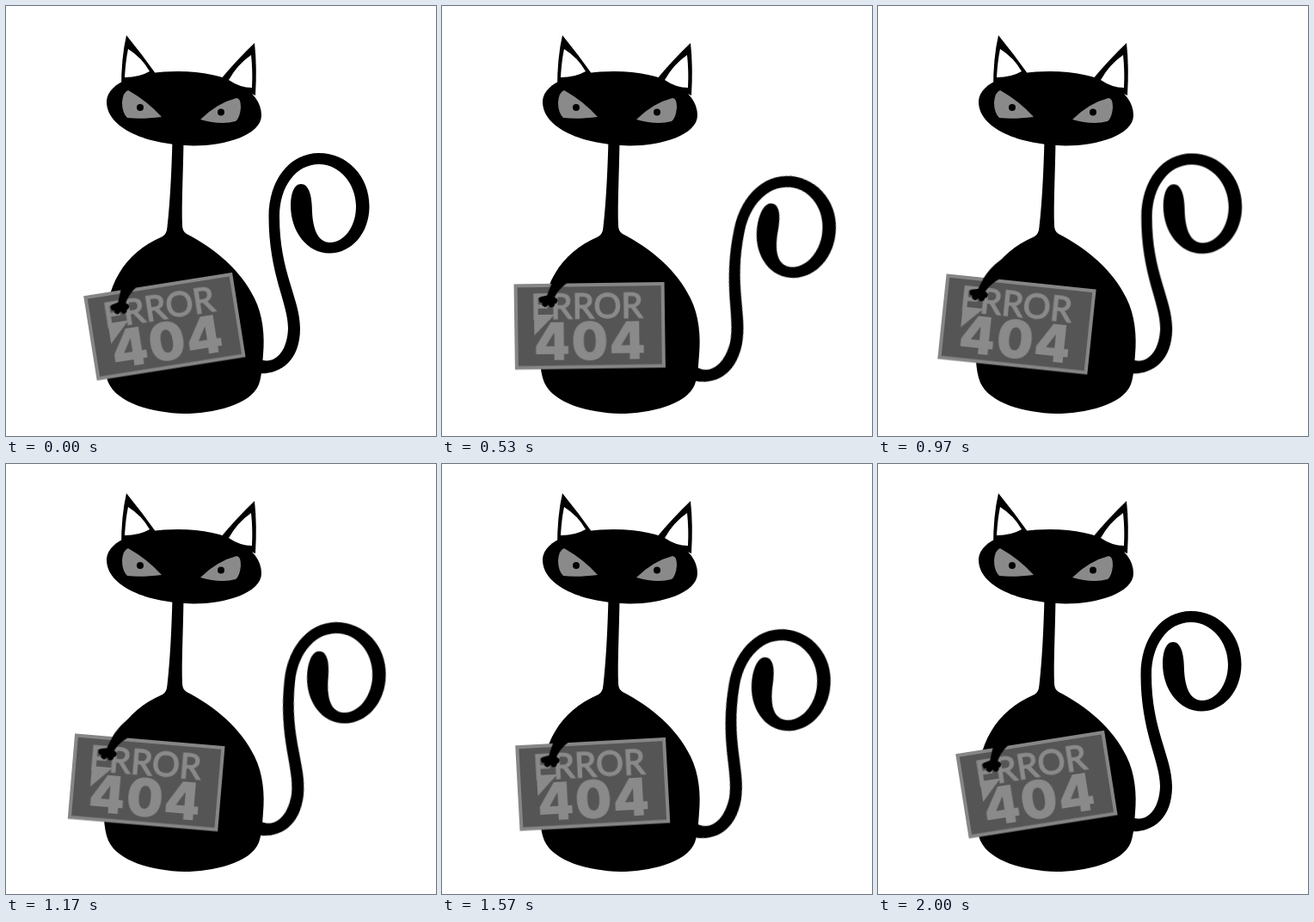
An HTML page that plays this animation: 500 by 500 pixels, repeating every 2.03 s.

```html
<!DOCTYPE html>
<html lang="en">
<head>
<meta charset="utf-8">
<title>Error 404 cat</title>
<style>
  html, body { margin: 0; width: 100%; height: 100%; overflow: hidden; background: #fff; }
  svg { display: block; width: 100vw; height: 100vh; }

  .tail, .held { animation: 2030ms cubic-bezier(.333, 0, .667, 1) infinite; }
  .tail { transform-origin: 254px 417px; animation-name: sway; }
  .held { transform-origin: 183.4px 284px; animation-name: swing; }

  /* Both motions rest for the last 30 ms of the loop. */
  @keyframes sway {
    0%, 45.98%, 98.52%, 100% { transform: rotate(0deg); }
    24.63%, 68.97% { transform: rotate(12deg); }
  }
  @keyframes swing {
    0%, 98.52%, 100% { transform: rotate(-9deg); }
    49.26% { transform: rotate(6deg); }
  }

  .fingers { fill: none; stroke: #000; stroke-width: 7; stroke-linecap: round; }
  .board { fill: #555; stroke: #868686; stroke-width: 4; }
  .light { fill: #8a8a8a; }
  .word { font: 400 40px Lato, sans-serif; stroke: #8a8a8a; stroke-width: 1.4; }
  .code { font: 900 60px Inter, sans-serif; letter-spacing: 1.5px; text-anchor: middle; }
</style>
</head>
<body>
<svg viewBox="0 0 500 500">
  <path class="tail" d="M270 422 L285 426 C312 432 342 418 342 375 C342 340 318 310 318 245 C318 210 337 184 364 184 C388 184 407 207 407 233 C407 258 392 275 377 275 C362 275 357 258 356 240 C356 220 352 207 343 207 C335 207 331 218 331 232 C331 262 350 287.500 376 287.500 C402 287.500 422.500 264 422.500 233 C422.500 198 397 171 364 171 C330 171 305.500 202 305.500 245 C305.500 312 328 345 328 375 C327 400 315 415 299 412 L270 405Z"/>

  <path d="M193.500 155 H206.500 C206 195 204 230 205 255 Q205 262 210 265 C243 282 273 307 289 340 C299 360 301 385 299 405 C298 420 297 432 294 440 C285 464 240 474 207 474 C170 473 130 462 119 438 C113 424 113 400 114 380 C116 325 136 288 182 268 Q187 265 187.500 257 C190.500 230 192.500 195 193.500 155Z"/>

  <g class="head">
    <path d="M117 110 C119 88 155 76 200 76 C258 76 297 98 297 127 C297 150 255 162.500 218 162.500 C165 161.500 116 143 117 110Z"/>
    <path d="M140 34 Q158 56 175 80 L134 96 Q134 60 140 34Z"/>
    <path d="M289 43 Q268 63 249 86 L290 104 Q292 70 289 43Z"/>
    <path fill="#fff" d="M142 50 Q158 60 167 76 Q155 83 138 83 Q139 64 142 50Z"/>
    <path fill="#fff" d="M285 57 Q269 68 259 86 Q272 95 286 95 Q287 75 285 57Z"/>
    <path class="light" d="M142 98 Q165 111 181 129 Q157 132 141 130 Q135 124 135 112 Q136 100 142 98Z"/>
    <path class="light" d="M226 132 Q245 113 268 107 Q273 107 273 118 Q272 130 267 134 Q250 139 226 132Z"/>
    <circle cx="156" cy="118" r="4"/>
    <circle cx="250" cy="123.5" r="4"/>
  </g>

  <g class="held">
    <rect class="board" x="85" y="324" width="171" height="95.500"/>
    <text class="light word" x="102.500" y="362.500">ERROR</text>
    <path class="light" d="M106 358 H130 L106 382Z"/>
    <text class="light code" x="171" y="411">404</text>
    <path d="M175 284 C150 290 134 306 126 324 L120.500 338 L129 341 C133 329 146 318 165 312Z"/>
    <path class="fingers" d="M123 339 L115.500 340.500 M124 340 L119 345.500 M124 340 L126.500 346 M124 339 L130 342"/>
  </g>
</svg>
</body>
</html>
```
